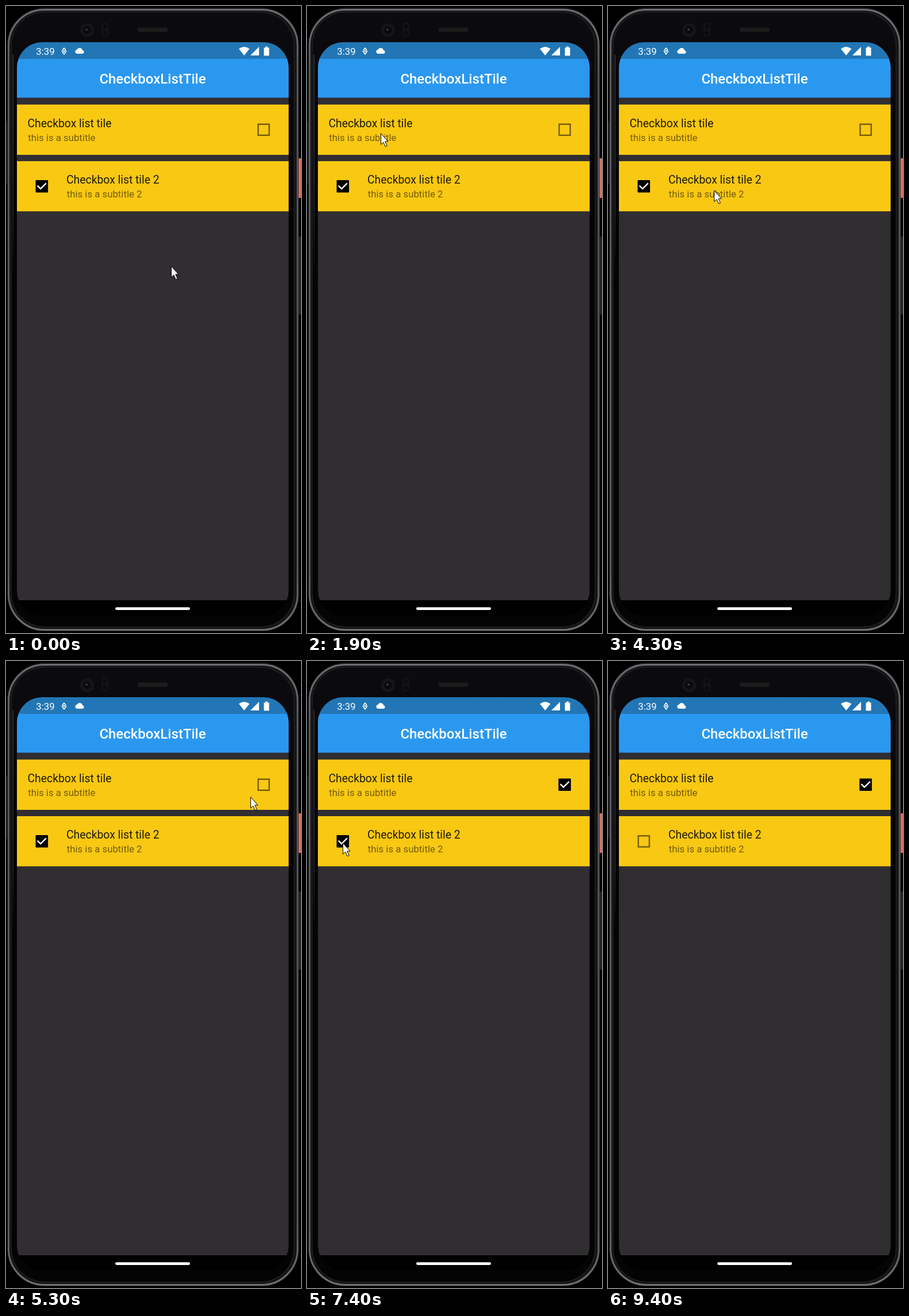
An HTML page that plays this animation: 513x1091 px, repeating every 9.5 s.

```html
<!DOCTYPE html>
<html lang="en">
<head>
<meta charset="utf-8">
<title>Checkbox list tiles</title>
<style>
  html, body { margin: 0; height: 100%; overflow: hidden; background: #000; }
  svg { display: block; width: 100%; height: 100%; font-family: Roboto, sans-serif; }
  .title { font-size: 19.35px; fill: #000; fill-opacity: .87; }
  .sub { font-size: 16.8px; fill: #000; fill-opacity: .54; }
</style>
</head>
<body>
<svg viewBox="0 0 513 1091">
  <defs>
    <clipPath id="screen"><rect x="19" y="63" width="472.5" height="998" rx="44"/></clipPath>
    <linearGradient id="sheen" x2="0" y2="1">
      <stop offset="0" stop-color="#38383b"/>
      <stop offset=".7" stop-color="#29292b"/>
      <stop offset="1" stop-color="#000"/>
    </linearGradient>
    <linearGradient id="metal" x2="0" y2="1">
      <stop offset="0" stop-color="#707073"/>
      <stop offset=".1" stop-color="#58585b"/>
      <stop offset=".9" stop-color="#58585b"/>
      <stop offset="1" stop-color="#707073"/>
    </linearGradient>
    <linearGradient id="glass" x2="0" y2="1">
      <stop offset="0" stop-color="#0c0b0f"/>
      <stop offset=".3" stop-color="#040405"/>
    </linearGradient>
    <g id="off"><rect x="1.2" y="1.2" width="19.2" height="19.2" fill="none" stroke="#000" stroke-opacity=".54" stroke-width="2.4"/></g>
    <g id="on">
      <rect width="21.6" height="21.6" rx="1"/>
      <path d="M3.24 9.72l5.4 5.4 9.72-9.72" fill="none" stroke="#fff" stroke-width="2.4"/>
    </g>
  </defs>

  <!-- phone body -->
  <rect x="0" y="200" width="3" height="110" fill="#19191c"/>
  <rect x="508" y="265" width="8" height="69" rx="2" fill="#df6f5d"/>
  <rect x="509" y="401" width="8" height="136" rx="2" fill="#242427"/>
  <rect x="2.5" y="3" width="506.5" height="1085" rx="64" fill="#1c1c1e"/>
  <rect x="4.5" y="6.5" width="502.5" height="1079" rx="62" fill="#141416" stroke="url(#metal)" stroke-width="3"/>
  <rect x="9" y="10.5" width="492" height="1070" rx="58" fill="url(#glass)" stroke="#2b2b2e"/>
  <rect x="11.5" y="85" width="1.5" height="395" fill="url(#sheen)"/>
  <circle cx="141" cy="42" r="12" fill="#161519"/>
  <circle cx="141" cy="42" r="7" fill="#0b0a0e"/>
  <circle cx="140" cy="41" r="1.6" fill="#505056"/>
  <rect x="166" y="29" width="12" height="24" rx="5" fill="#131216"/>
  <circle cx="172" cy="35" r="3.5" fill="#0a090c"/>
  <circle cx="172" cy="47" r="3.5" fill="#0a090c"/>
  <rect x="229" y="37.5" width="52" height="7.5" rx="3" fill="#1d1b1b"/>

  <!-- screen -->
  <g clip-path="url(#screen)">
    <path d="M19 63h473v998H19z"/>
    <path d="M19 92h473v942H19z" fill="#302e31"/>
    <path d="M19 63h473v29H19z" fill="#2276b5"/>
    <path d="M19 92h473v67.5H19z" fill="#2b98f0"/>
    <path d="M19 171.5h473V259H19zM19 270h473v87.2H19z" fill="#f9c812"/>
  </g>
  <rect x="190" y="1046.2" width="130" height="4.8" rx="2.4" fill="#fff"/>

  <!-- status bar -->
  <g fill="#fff">
    <text x="52.3" y="85" font-size="16.8">3:39</text>
    <path d="M101 73l2.6 3.3-2.6 3-2.600-3zM97 78l4 6 4-6" fill="none" stroke="#fff" stroke-width="1.5" stroke-linejoin="round"/>
    <path d="M123.500 83a3.600 3.600 0 0 1-.2-7.1 5.200 5.200 0 0 1 9.700 1.200 3 3 0 0 1 .3 5.900z"/>
    <path d="M405 74.500q9.200-7 18.400 0L414.200 86z"/>
    <path d="M440 71v15h-15z"/>
    <path d="M448.500 72.500h2.500v-2h4v2h2.500v14h-9z"/>
  </g>
  <text x="255" y="135" font-size="24" font-weight="500" fill="#fff" text-anchor="middle">CheckboxListTile</text>

  <!-- tiles -->
  <text class="title" x="37.5" y="210.5">Checkbox list tile</text>
  <text class="sub" x="38.2" y="234.7">this is a subtitle</text>
  <use id="box1" x="437.3" y="204.5" href="#off"/>
  <text class="title" x="105" y="309">Checkbox list tile 2</text>
  <text class="sub" x="105.7" y="333.2">this is a subtitle 2</text>
  <use id="box2" x="51.5" y="303" href="#on"/>

  <path id="cursor" d="M.5.8V20l4.3-3.9 3.5 7.6 2.9-1.3-3.4-7.5H13z" fill="#fff" stroke="#000" stroke-linejoin="round"/>
</svg>
<script>
const LOOP = 9500, STEP = 100;
// time, then the position of the cursor's tip
const path = [
  [0, 287, 452], [1000, 200, 348], [1900, 128, 221], [2400, 135, 224],
  [3300, 148, 325], [4100, 165, 327], [5300, 425, 236], [5900, 445, 226],
  [6500, 445, 226], [6800, 320, 390], [7000, 175, 350], [7400, 62, 316],
  [7700, 62, 316], [8300, 419, 297], [8800, 496, 594], [8900, 540, 600], [LOOP, 540, 600]
];
const [box1, box2, cursor] = ['box1', 'box2', 'cursor'].map(id => document.getElementById(id));
const check = (box, on) => box.setAttribute('href', on ? '#on' : '#off');

function place(t) {
  const i = path.findIndex(p => p[0] > t);
  const [t0, x0, y0] = path[i - 1], [t1, x1, y1] = path[i];
  const k = (t - t0) / (t1 - t0), e = k * k * (3 - 2 * k);
  return [x0 + (x1 - x0) * e, y0 + (y1 - y0) * e];
}

const start = performance.now();
function draw() {
  const t = Math.floor((performance.now() - start) % LOOP / STEP) * STEP;
  cursor.setAttribute('transform', `translate(${place(t)})`);
  check(box1, t >= 6100);
  check(box2, t < 7600);
  requestAnimationFrame(draw);
}
draw();
</script>
</body>
</html>
```
